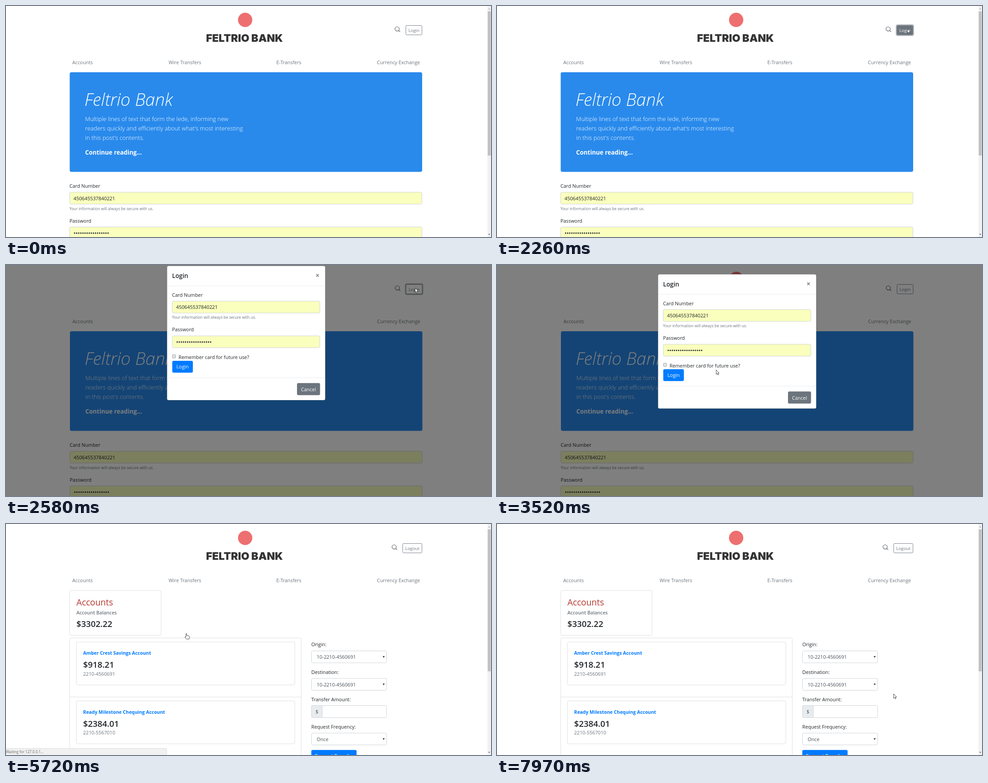
Animation, 1085 px wide and 516 px high, one loop 8 s. Source, as an HTML page:

```html
<!DOCTYPE html>
<html lang="en">
<head>
<meta charset="utf-8">
<title>Online banking login</title>
<style>
html, body { margin: 0; width: 100%; height: 100%; overflow: hidden; background: #fff; }
svg { display: block; }
text { font: 10.85px "Open Sans", "Noto Sans", sans-serif; fill: #212529; white-space: pre; }
.mid { text-anchor: middle; }
.muted { fill: #6c757d; }
.light { fill: #fff; }
.field { fill: #495057; }
.link { font-size: 10.45px; font-weight: 700; fill: #007bff; }
.semi { font-size: 10.65px; font-weight: 600; }
.small { font-size: 8.65px; }
.btn { font-size: 9.8px; }
.status { font-size: 8.1px; fill: #666; }
.title { font-size: 13.7px; font-weight: 600; }
.brand { font: 900 23.6px Inter, sans-serif; fill: #343434; }
.display { font-size: 39.3px; font-weight: 300; font-style: italic; }
.lede { font-size: 13.2px; font-weight: 300; }
.more { font-size: 13.4px; font-weight: 700; }
.heading { font-size: 19.3px; font-weight: 500; fill: #b5382f; }
.money { font-size: 18.8px; font-weight: 600; }
</style>
</head>
<body>
<svg id="stage" width="1085" height="516" viewBox="0 0 1085 516"></svg>
<script>
const text = (x, y, str, cls = '') => `<text x="${x}" y="${y}" class="${cls}">${str}</text>`;
const box = (x, y, w, h, fill, stroke = 'none', rx = 3, id = '') =>
  `<rect x="${x}" y="${y}" width="${w}" height="${h}" fill="${fill}" stroke="${stroke}" rx="${rx}" ${id && `id="${id}"`}/>`;
const path = (d, attrs) => `<path d="${d}" ${attrs}/>`;
const group = (id, ...parts) => `<g id="${id}">${parts.join('')}</g>`;
const ring = (id, x, y, w, h, color) =>
  `<rect id="${id}" x="${x}" y="${y}" width="${w}" height="${h}" rx="3" fill="none" stroke="${color}" stroke-width="2.3" stroke-opacity=".5"/>`;

const header = searchX => [
  '<circle cx="535" cy="31" r="16" fill="#ee6f70"/>',
  text(533.5, 79.5, 'FELTRIO BANK', 'brand mid'),
  `<circle cx="${searchX}" cy="51.2" r="4.7" fill="none" stroke="#555b60" stroke-width="1.2"/>`,
  path(`M${searchX + 3.4} 54.6l3.3 3.3`, 'stroke="#555b60" stroke-width="1.3"'),
  ...[[171.2, 'Accounts'], [400.2, 'Wire Transfers'], [632.8, 'E-Transfers'], [878, 'Currency Exchange']]
    .map(([x, label]) => text(x, 129.5, label, 'muted mid')),
].join('');

// Card number and password fields, shared by the page and the dialog
const credentials = (x, y, w) => [
  text(x, y, 'Card Number'),
  box(x + .5, y + 10, w, 26.5, '#faffbd', '#ced4da'),
  text(x + 9, y + 27.5, '450645537840221'),
  text(x, y + 49.5, 'Your information will always be secure with us.', 'small muted'),
  text(x, y + 77.5, 'Password'),
  box(x + .5, y + 87.5, w, 26.5, '#faffbd', '#ced4da'),
  path(`M${x + 11.5} ${y + 101.2}h75`, 'stroke="#212529" stroke-width="3.1" stroke-linecap="round" stroke-dasharray="0 4.67"'),
].join('');

const home = group('home', header(875),
  ring('loginRing', 893.2, 42.2, 38.6, 23.6, '#6c757d'),
  box(894.5, 43.5, 36, 21, '#fff', '#7b838a', 2, 'loginBtn'),
  `<text id="loginLabel" class="btn mid" x="912.6" y="58">Login</text>`,
  box(142.5, 148, 788.5, 222.5, '#298aec', 'none', 4),
  text(175.5, 223, 'Feltrio Bank', 'display light'),
  text(177, 257, 'Multiple lines of text that form the lede, informing new', 'lede light'),
  text(177, 278, "readers quickly and efficiently about what's most interesting", 'lede light'),
  text(177, 299, "in this post's contents.", 'lede light'),
  text(177, 332, 'Continue reading...', 'more light'),
  credentials(142, 406, 788));

const account = (y, name, amount, number) => [
  box(157.5, y + .5, 488.5, 96, '#fff', '#dfdfdf'),
  text(172.5, y + 29, name, 'link'),
  text(172.5, y + 58, amount, 'money'),
  text(172.5, y + 75.5, number, 'muted'),
].join('');

const select = (y, label, value) => [
  text(683, y, label),
  box(683.5, y + 10.5, 168, 26.5, '#fff', '#ced4da'),
  text(695, y + 28, value, 'field'),
  path(`M842.6 ${y + 22}h4.6l-2.3 4z`, 'fill="#343a40"'),
].join('');

const accounts = group('accounts', header(868.3),
  box(887.5, 43.5, 43, 21, '#fff', '#7b838a', 2),
  text(909, 58, 'Logout', 'btn muted mid'),
  box(142.5, 148.5, 204.5, 100, '#fff', '#dfdfdf'),
  text(157.5, 182, 'Accounts', 'heading'),
  text(157.5, 202, 'Account Balances', 'semi muted'),
  text(157.5, 230, '$3302.22', 'money'),
  box(142.5, 254.5, 518, 300, '#fff', '#dfdfdf'),
  path('M143 386.5h517', 'stroke="#dfdfdf"'),
  account(263, 'Amber Crest Savings Account', '$918.21', '2210-4560691'),
  account(394.5, 'Ready Milestone Chequing Account', '$2384.01', '2210-5567010'),
  select(273, 'Origin:', '10-2210-4560691'),
  select(334.5, 'Destination:', '10-2210-4560691'),
  text(683, 395.5, 'Transfer Amount:'),
  box(683.5, 405.5, 168, 27, '#fff', '#ced4da'),
  box(683.5, 405.5, 24, 27, '#e9ecef', '#ced4da', 2),
  text(695.5, 423, '$', 'field mid'),
  select(456.5, 'Request Frequency:', 'Once'),
  box(683, 504.8, 101.3, 27, '#007bff'),
  text(733.7, 522, 'Request Transfer', 'light mid'));

const scrollbar = group('scrollbar',
  box(1077, 0, 8, 516, '#f1f1f1', 'none', 0),
  box(1077.7, 12, 6.6, 322, '#c1c1c1', 'none', 0, 'thumb'),
  path('M1079 7.5l2-2.6 2 2.6z', 'fill="#a3a3a3"'),
  path('M1079 509l2 2.6 2-2.6z', 'fill="#505050"'));

const modal = group('modal',
  box(360.2, 20.7, 354, 300, '#fff', '#0003', 3.5),
  text(371.5, 48, 'Login', 'title'),
  path('M694 39l5.6 6m0-6l-5.6 6', 'stroke="#777" stroke-width="1.5"'),
  path('M361 65.5h353M361 270.5h353', 'stroke="#e9ecef"'),
  credentials(371.5, 89.5, 330),
  box(372.3, 219.3, 7.2, 7.2, '#e4e4e4', '#a0a0a0', 1),
  text(386, 228.5, 'Remember card for future use?'),
  ring('submitRing', 370.9, 231.6, 48.2, 28.8, '#007bff'),
  box(372, 232.7, 46, 26.6, '#007bff', 'none', 3, 'submitBtn'),
  text(395, 250, 'Login', 'light mid'),
  box(651, 282.4, 51.5, 27.2, '#6c757d'),
  text(676.7, 300.5, 'Cancel', 'light mid'));

const status = group('status',
  box(-3, 501.3, 362.3, 20, '#f1f1f1', '#dadada', 2),
  text(0, 512, 'Waiting for 127.0.0.1...', 'status'));

const outline = 'fill="#fff" stroke="#222" stroke-width=".8" stroke-linejoin="round"';
const cursor = group('cursor',
  path('M.4 .4V10.2L2.5 8.2 4.1 11.7 5.6 11 4.1 7.6H7z', `id="arrow" ${outline}`),
  path('M-1 1.6Q0 .4 1 1.6V5.6L6 6.7Q7 7 7 8.2L6 13.6H.2L-3.2 9.4Q-3.4 7.6-1 9z', `id="hand" ${outline}`));

stage.innerHTML = home + accounts + scrollbar +
  box(0, 0, 1085, 516, '#000', 'none', 0, 'backdrop') + modal + status + cursor;
const el = id => document.getElementById(id);
const set = (id, attr, value) => el(id).setAttribute(attr, value);
const show = (id, on) => set(id, 'visibility', on ? 'visible' : 'hidden');

// Cursor stops: time, x, y
const stops = [
  [560, 1061, 514], [1310, 936, 103], [1340, 936, 103], [1780, 918, 50.5], [2420, 918, 50.5],
  [2580, 915, 51], [2770, 913, 51], [3520, 490, 234], [3640, 490, 234], [4270, 403.5, 243.5],
  [5870, 403.5, 243.5], [6200, 405, 239], [6380, 405, 239], [7210, 642, 292],
  [7230, 642, 292], [7970, 887, 379],
];
const ramp = (t, start, length) => Math.min(1, Math.max(0, (t - start) / length));
const mix = (a, b, k) => a + (b - a) * k;
const blend = (a, b, k) => `rgb(${a.map((v, i) => Math.round(mix(v, b[i], k)))})`;
const GRAY = [108, 117, 125], WHITE = [255, 255, 255];

// CSS ease-out, cubic-bezier(0, 0, .58, 1)
function easeOut(x) {
  let lo = 0, hi = 1;
  for (let i = 0; i < 20; i++) {
    const s = (lo + hi) / 2;
    if (1.74 * (1 - s) * s * s + s ** 3 < x) lo = s; else hi = s;
  }
  return lo * lo * (3 - 2 * lo) + 3 * lo * (1 - lo) ** 2 * 0;
}

function cursorAt(t) {
  const next = stops.findIndex(s => s[0] > t);
  if (next < 0) return stops[stops.length - 1].slice(1);
  if (next === 0) return stops[0].slice(1);
  const a = stops[next - 1], b = stops[next];
  const k = ramp(t, a[0], b[0] - a[0]), eased = k * k * (3 - 2 * k);
  return [mix(a[1], b[1], eased), mix(a[2], b[2], eased)];
}

function draw(t) {
  const loggedIn = t >= 5660, modalOpen = t >= 2270 && !loggedIn;
  show('home', !loggedIn);
  show('accounts', loggedIn);
  show('scrollbar', !modalOpen);
  set('thumb', 'height', loggedIn ? 317 : 322);
  set('home', 'transform', `translate(${modalOpen ? .5 : 0})`);

  const hover = ramp(t, 1640, 150) - ramp(t, 2295, 150);
  set('loginBtn', 'fill', blend(WHITE, GRAY, hover));
  set('loginLabel', 'style', `fill:${blend(GRAY, WHITE, hover)}`);
  set('loginRing', 'opacity', ramp(t, 1960, 150) - ramp(t, 2810, 100));

  set('backdrop', 'opacity', loggedIn ? 0 : ramp(t, 2269, 150) / 2);
  set('modal', 'opacity', loggedIn ? 0 : ramp(t, 2412, 150));
  set('modal', 'transform', `translate(0 ${-75 * (1 - easeOut(ramp(t, 2412, 300)))})`);
  set('submitBtn', 'fill', blend([0, 123, 255], [0, 105, 217], ramp(t, 4080, 150)));
  set('submitRing', 'opacity', ramp(t, 4580, 150));
  set('status', 'opacity', t < 5210 ? 0 : 1 - ramp(t, 7500, 200));

  const hand = t >= 4090 && t < 6000, visible = t >= 560;
  set('cursor', 'transform', `translate(${cursorAt(t)})`);
  show('arrow', visible && !hand);
  show('hand', visible && hand);
}

function tick() {
  draw(performance.now() % 8000);
  requestAnimationFrame(tick);
}
tick();
</script>
</body>
</html>
```
